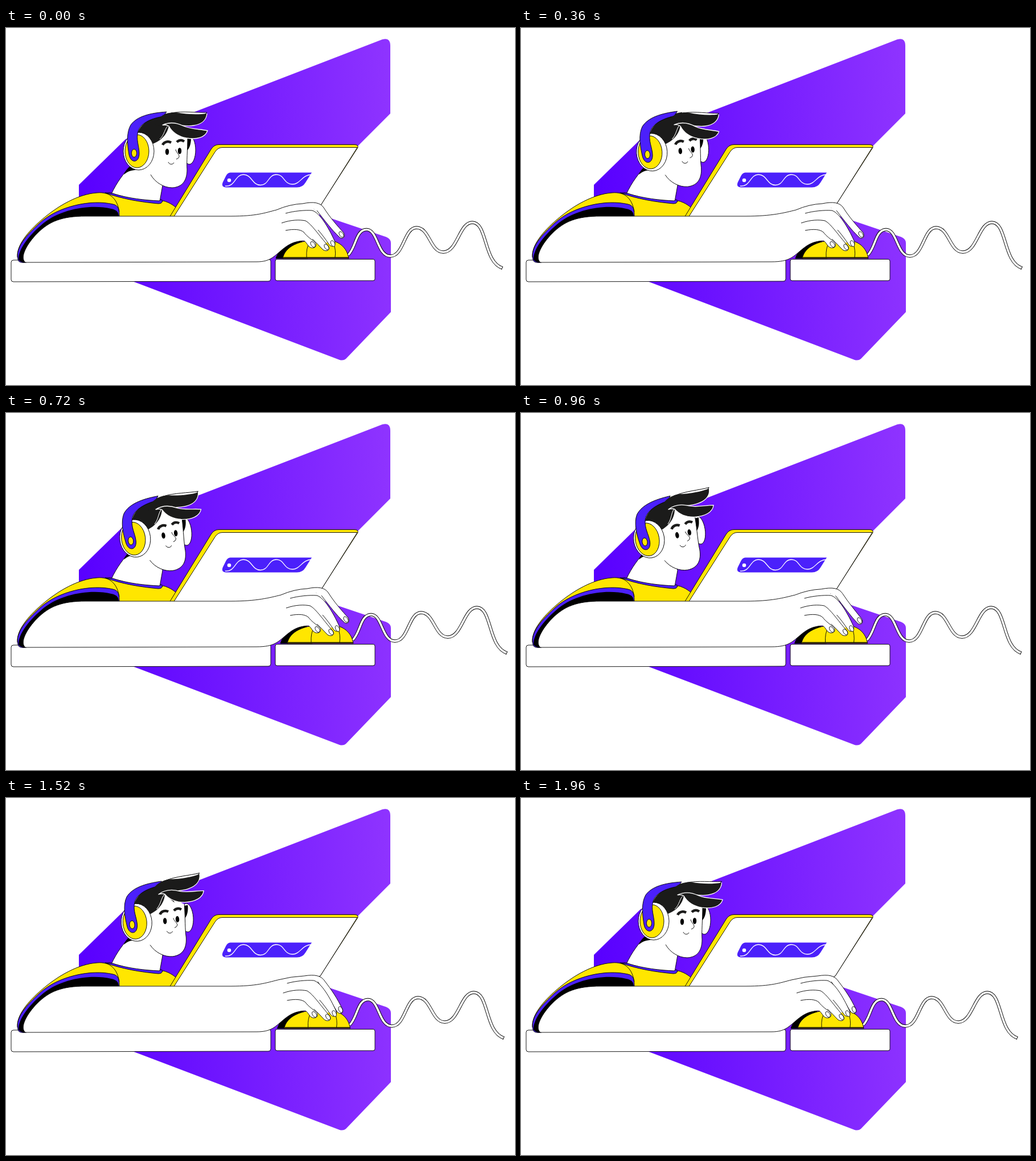
An HTML page with a canvas for the animation above (2 s loop, 894 by 626 pixels).

```html
<!DOCTYPE html>
<html lang="en">
<head>
<meta charset="utf-8">
<title>At the desk</title>
<style>
html, body { margin: 0; width: 100%; height: 100%; overflow: hidden; background: #fff; }
canvas { display: block; }
</style>
</head>
<body>
<canvas id="stage" width="894" height="626"></canvas>
<script>
const ctx = document.getElementById('stage').getContext('2d');
const LOOP = 2000, STEP = 40, THIN = 0.9;
const INK = '#000', HAIR = '#1b1b1a', YELLOW = '#ffe600', VIOLET = '#4b20fb', WHITE = '#fff';

const backdrop = ctx.createLinearGradient(128, 300, 680, 270);
backdrop.addColorStop(0, '#5800ff');
backdrop.addColorStop(1, '#8e33ff');

// Keys are [time, value] pairs, joined by straight lines.
const slide = [[0, 0], [180, 4.6], [360, 8], [540, 8.9], [720, 8], [960, 6.6], [1200, 4.4], [1520, 2.6], [1960, 0], [2000, 0]];
const tilt = [[0, 0], [960, 0.16], [1960, 0], [2000, 0]];
const sway = [[0, 0], [180, 0.06], [360, 0.085], [720, -0.01], [960, -0.06], [1200, -0.14], [1520, -0.135], [1960, -0.02], [2000, 0]];
const lift = [[0, 1], [860, 1], [960, 0.8], [1120, 0], [2000, 0]];

function at(keys, t) {
  let i = 1;
  while (i < keys.length - 1 && t > keys[i][0]) i++;
  const [t0, a] = keys[i - 1], [t1, b] = keys[i];
  return a + (b - a) * (t - t0) / (t1 - t0);
}

function shape(d, fill, line = INK, width = THIN) {
  const p = new Path2D(d);
  if (fill) { ctx.fillStyle = fill; ctx.fill(p); }
  if (line) { ctx.strokeStyle = line; ctx.lineWidth = width; ctx.stroke(p); }
}

function oval(x, y, rx, ry, fill, line = INK, turn = 0) {
  ctx.beginPath();
  ctx.ellipse(x, y, rx, ry, turn, 0, 7);
  if (fill) { ctx.fillStyle = fill; ctx.fill(); }
  if (line) { ctx.strokeStyle = line; ctx.lineWidth = THIN; ctx.stroke(); }
}

function turned(x, y, angle, draw) {
  ctx.save();
  ctx.translate(x, y);
  ctx.rotate(angle);
  ctx.translate(-x, -y);
  draw();
  ctx.restore();
}

function drawBackdrop() {
  shape('M128 275 L210 195 L334 146 L661 20 Q675 16 675 31 V150 L619 206 L548 277 L530 320 ' +
    'L570 333.500 L668 366.500 Q676 370 676 377 V498 L599 578 Q594 584 586 582 L222 444 L128 400 Z', backdrop, null);
}

function drawBody() {
  // neck
  shape('M220 240 C206 256 195 270 185 291 C215 300 240 303 270 304 L275 276 L268 240 Z', WHITE);
  shape('M207 257 C210 249 216 243 222 241 L230 249 C221 249 214 251 207 257 Z', INK, null);
  // shirt
  shape('M160 290 L183 289 C215 299 245 305 271 307 L276 303 C288 306 298 313 303 320 L293 331 H190 Z', YELLOW);
  shape('M174 289 L187 290 C215 299 245 302 269 303 C272 301 274 300 274 302 C275 306 273 308 267 308 C235 305 205 300 174 289 Z', VIOLET);
}

function drawSleeve() {
  shape('M20 402 C18 382 38 357 63 336 C92 311 128 291 160 289 C183 287 195 299 199 322 L150 334 L40 408 Z', YELLOW);
  shape('M21 406 C16 385 36 363 59 342 C92 312 150 300 188 309 C197 311 199 317 199 330 L110 334 L36 411 Q22 413 21 406 Z', VIOLET);
  shape('M22 406 C21 387 43 361 66 342 C100 316 150 309 185 317 C195 319 198 323 198 331 L120 333 L36 411 Q25 412 22 406 Z', INK, null);
}

function drawHair(angle) {
  turned(272, 170, angle, () => {
    shape('M290 149 C312 145 335 149 353 148 L340 160 Z', WHITE);
    shape('M262 171 C265 156 280 147 299 148 C319 152 339 152 353 150 C352 161 344 169 329 171 C312 174 296 166 276 170 Z', HAIR, null);
    shape('M353 150 C352 161 344 169 329 171 C312 174 296 166 276 170', null, WHITE, 1.3);
    shape('M275 170 C288 164 302 167 312 172 C326 178 341 177 354 180 C350 192 335 196 317 193 C302 190 292 183 286 172 Q281 169 275 170 Z', HAIR, WHITE, 1.3);
  });
}

function drawHead(angle, hair) {
  turned(262, 270, -angle, () => {
    oval(322, 214, 11, 25, WHITE);
    shape('M317 193 L325 192 C325 202 323 210 318 215 Z', INK, null);
    const jaw = 'M254 257 C262 271 277 280 292 280 C311 279 318 266 318 248 C317 235 319 215 319 190';
    shape(jaw + ' L285 170 L240 185 Z', WHITE, null);
    shape(jaw);
    shape('M230 196 C228 175 248 154 290 149 L302 186 L286 171 C284 186 272 198 258 203 C252 190 241 184 230 196 Z', HAIR, null);
    shape('M286 170 C278 176 279 187 270 195', null, WHITE, 1);

    // face
    shape('M275 205 C278 199 285 198 290 201', null, HAIR, 4.5);
    shape('M300 200 C304 196 309 196 313 199', null, HAIR, 4.5);
    oval(283, 217, 3.2, 5.5, INK, null);
    oval(305, 215.5, 3.2, 5.5, INK, null);
    shape('M298 213 C299 219 305 222 304 226 Q303 229 299 230');
    shape('M285 235 C287 240 293 240 295 236');

    // headphones
    oval(233, 216, 27, 33, WHITE);
    oval(230, 216, 21, 29, YELLOW);
    shape('M216 222 C213 204 211 184 219 170 C230 155 252 149 282 147 L276 155 C252 159 236 168 232 181 ' +
      'C228 196 234 207 234 220 C234 237 219 238 216 222 Z', VIOLET);
    oval(225, 219.5, 4.5, 7, YELLOW);
    drawHair(hair);
  });
}

function drawLaptop() {
  shape('M287 332 L360 213 Q365 204.500 374 204.500 H612 Q619 204.500 618 209.500 L552 312 L500 332 Z', YELLOW);
  shape('M294 332 L367 217.500 Q372 209.500 380 209.500 H617 L552 312 L500 340 H294 Z', WHITE);
  shape('M394 253.500 H537 L526 271 Q521 279.500 511 279.500 H387 Q377 279 381 270 L386 260 Q389 253.500 394 253.500 Z', VIOLET, null);
  oval(392, 267, 3.3, 3.3, WHITE, null);
  shape('M385 277 C403 279 402 257 417 257 C432 257 432 275.500 447 275.500 C462 275.500 460 257 475 257 ' +
    'C489 257 488 274 503 274 C517 274 520 257 537 257', null, WHITE, 1.3);
}

function drawDesk() {
  shape('M13 407 L461 405.500 Q465 405.500 465 409 V440 Q465 444 461 444 L13 445 Q9 445 9 441 V411 Q9 407 13 407 Z', WHITE);
  shape('M476 405.500 H645 Q648 405.500 648 409 V440 Q648 443 645 443 H476 Q473 443 473 440 V409 Q473 405.500 476 405.500 Z', WHITE);
}

function drawMouse() {
  const cable = 'M601 398 C615 385 614 354 633 353.500 C653 353 652 400 675 400 C699 400 699 350 721 350 ' +
    'C744 350 745 393 768 393 C793 393 796 341 819 341 C846 341 838 410 872 421';
  shape(cable, null, INK, 5.4);
  shape(cable, null, WHITE, 3.6);
  shape('M870 423.500 L872.500 418.500');
  shape('M474 404 C478 389 495 378 518 371 L530 404 Z', INK);
  shape('M486 404 C490 384 513 371 556 371 C586 371 599 386 602 404 Z', YELLOW);
  shape('M487 402.500 H602', null, INK, 1.6);
  shape('M528 402 Q527 386 533 376 M578 402 Q580 390 575 376');
}

function drawArm(dx, up) {
  const top = 312 - 4 * up;
  const x = n => n + dx;
  const upper = `C76 339 98 330 140 330 L395 330 C440 330 ${x(455)} 324 ${x(475)} 319 Q${x(498)} ${top + 1} ${x(521)} ${top}`;
  const lower = `M${x(523)} 373 C${x(505)} 374 ${x(496)} 380 ${x(487)} 387 C${x(470)} 401 ${x(464)} 410 440 410 L34 411 C23 402 38 377 55 360 `;
  shape(lower + upper + ` L${x(548)} 322 L${x(566)} 376 L${x(547)} 378 Z`, WHITE, null);
  shape(lower + upper);
}

function finger(d, nx, ny, turn) {
  shape(d, WHITE);
  oval(nx, ny, 3.2, 5.6, WHITE, INK, turn);
}

function drawFingers(up) {
  const mix = (low, high) => low + (high - low) * up;
  const p = (x0, y0, x1, y1) => mix(x0, x1) + ' ' + mix(y0, y1);
  finger(`M${p(521, 312, 521, 308)} C${p(540, 309, 540, 304)} ${p(551, 311, 552, 306)} ${p(558, 322, 558, 315)} ` +
    `C${p(568, 335, 568, 331)} ${p(580, 352, 582, 347)} ${p(588, 370, 593, 359)} ` +
    `C${p(591, 378, 597, 367)} ${p(584, 380, 590, 372)} ${p(579, 375, 585, 366)} ` +
    `C${p(570, 360, 573, 355)} ${p(556, 338, 560, 338)} ${p(545, 322, 546, 320)}`,
    mix(585, 589), mix(371, 362), mix(-0.4, -0.6));
  finger('M491 325 C505 321 525 319 538 320 C551 324 566 349 577 373 C581 383 572 386 567 379 C561 370 555 362 548 354', 574, 378, -0.45);
  finger('M484 342 C501 336 516 336 526 338 C537 344 549 363 566 382 C570 389 564 393 557 389 C550 382 545 376 538 370', 563, 384, -0.6);
  finger('M491 355 C506 352 517 353 523 358 C529 366 536 370 543 376 C548 384 539 389 532 383 C528 378 526 374 523 373', 539, 379.500, -0.6);
}

function draw(t) {
  const dx = at(slide, t), up = at(lift, t);
  ctx.fillStyle = WHITE;
  ctx.fillRect(0, 0, 894, 626);
  ctx.lineJoin = 'round';
  drawBackdrop();
  drawBody();
  drawHead(at(tilt, t), at(sway, t));
  drawLaptop();
  drawDesk();
  drawSleeve();
  ctx.save();
  ctx.translate(dx, 0);
  drawMouse();
  ctx.restore();
  drawArm(dx, up);
  ctx.save();
  ctx.translate(dx, 0);
  drawFingers(up);
  ctx.restore();
}

const start = performance.now();
function tick() {
  const t = (performance.now() - start) % LOOP;
  draw(Math.floor(t / STEP) * STEP);
  requestAnimationFrame(tick);
}
tick();
</script>
</body>
</html>
```
